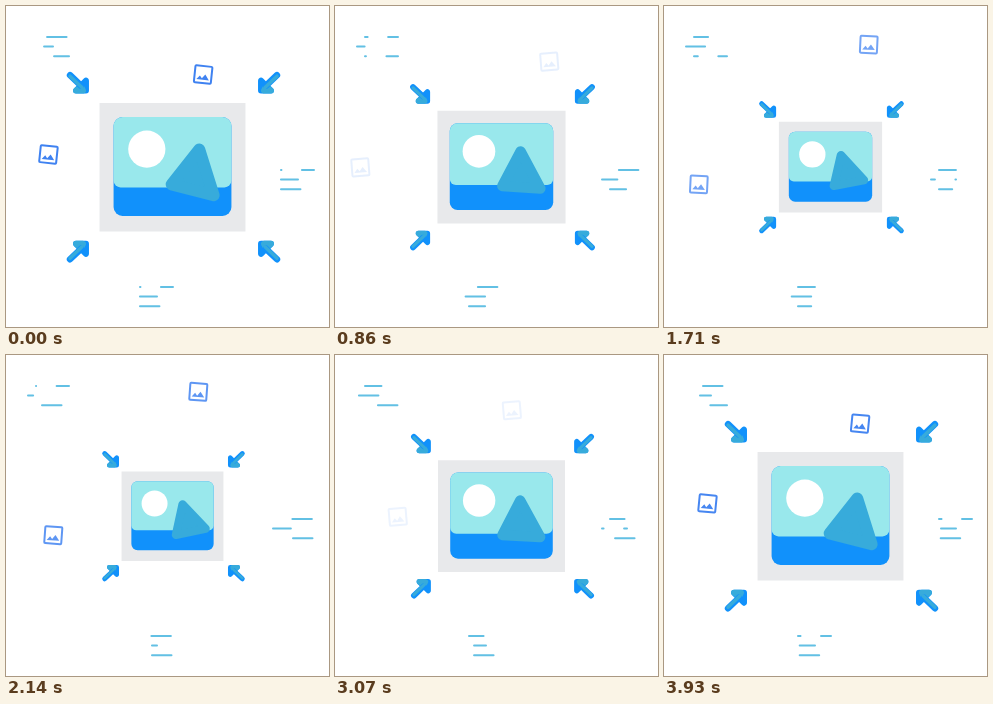
An HTML page with a canvas for the animation above (4000 ms loop, 323 by 321 pixels).

```html
<!DOCTYPE html>
<html>
<head>
<meta charset="utf-8">
<style>
  html, body { margin: 0; width: 100%; height: 100%; overflow: hidden; background: #fff; }
  canvas { display: block; width: 323px; height: 321px; }
</style>
</head>
<body>
<canvas></canvas>
<script>
const LOOP = 4000;
const CENTER = { x: 166.5, y: 161.2 };
const BLUE = '#1191fb', TEAL = '#37abdb', CYAN = '#99e8ec';
const canvas = document.querySelector('canvas');
const ctx = canvas.getContext('2d');
const dpr = window.devicePixelRatio || 1;
canvas.width = 323 * dpr;
canvas.height = 321 * dpr;

function at(x, y, draw) {
  ctx.save();
  ctx.translate(x, y);
  draw();
  ctx.restore();
}

function rotate(degrees) {
  ctx.rotate(degrees * Math.PI / 180);
}

function roundTriangle(a, b, c, radius, color) {
  ctx.beginPath();
  for (const point of [a, b, c]) ctx.lineTo(...point);
  ctx.closePath();
  ctx.fillStyle = ctx.strokeStyle = color;
  ctx.lineWidth = radius * 2;
  ctx.lineJoin = 'round';
  ctx.fill();
  ctx.stroke();
}

// A box centred horizontally on the current origin
function box(top, width, height, radius, color) {
  ctx.beginPath();
  ctx.roundRect(-width / 2, top, width, height, radius);
  ctx.fillStyle = color;
  ctx.fill();
}

function line(x1, y1, x2, y2, width, color) {
  ctx.beginPath();
  ctx.moveTo(x1, y1);
  ctx.lineTo(x2, y2);
  ctx.lineWidth = width;
  ctx.strokeStyle = color;
  ctx.lineCap = 'round';
  ctx.stroke();
}

// Three rows of dashes sliding behind fixed windows; laps = dashes passing per loop
function drawDashes(x, y, phase, starts, laps) {
  ctx.setLineDash([19.5, 20.5]);
  starts.forEach((start, row) => {
    const left = row === 1 ? -7 : 1;
    const right = row === 1 ? 18 : 34;
    const shift = left - start - 1 - 40 * laps[row] * phase;
    ctx.lineDashOffset = (shift % 40 + 40) % 40;
    const rowY = y + 9.6 * row;
    line(x + left, rowY, x + right, rowY, 2, '#62c0e4');
  });
  ctx.setLineDash([]);
}

function drawIcon(x, y, visible) {
  at(x, y, () => {
    rotate(12 * visible - 6);
    ctx.globalAlpha = visible;
    ctx.strokeStyle = ctx.fillStyle = '#3f82f1';
    ctx.lineWidth = 2;
    ctx.beginPath();
    ctx.roundRect(-8.5, -8.5, 17, 17, 1);
    ctx.stroke();
    ctx.fill(new Path2D('M2.2-.2L-.9 3.9-3.1 1.2-6.3 5.2H6.3z'));
  });
}

function drawPicture(shrink) {
  at(CENTER.x, CENTER.y, () => {
    const scale = 1 - 0.31 * shrink;
    ctx.scale(scale, scale);
    box(-64.5, 146.6, 129, 0, '#e8e9eb');
    box(-50.4, 118.4, 99.4, 9, BLUE);
    box(-50.4, 118.4, 70.7, [9, 9, 7, 7], CYAN);
    ctx.beginPath();
    ctx.arc(-25.8, -18.2, 18.7, 0, 7);
    ctx.fillStyle = '#fff';
    ctx.fill();
    ctx.translate(22.5, 9.5);
    rotate(14.4 - 27 * shrink);
    roundTriangle([-2.3, -27.5], [-20.8, 13.2], [22.8, 13.5], 6, TEAL);
  });
}

function drawArrow(sideX, sideY, shrink) {
  const x = CENTER.x + 1 + sideX * (85 - 31 * shrink);
  const y = CENTER.y + sideY * (74 - 25.7 * shrink);
  at(x, y, () => {
    const scale = 1 - 0.25 * shrink;
    ctx.scale(-sideX * scale, -sideY * scale);
    roundTriangle([-3, -13], [-3, -3], [-13, -3], 3, BLUE);
    roundTriangle([-8, -7], [-6, -3], [-13, -3], 3, TEAL);
    line(-19, -18.5, -8, -8, 6.5, BLUE);
    line(-19, -17.5, -7, -6, 3.5, TEAL);
  });
}

function render(phase) {
  const turn = phase * 2 * Math.PI;
  const shrink = 0.015 + 0.985 * (1 - Math.cos(turn)) / 2;
  const visible = Math.abs(1 - (phase * 4) % 2);
  const angle = turn + 0.08 * Math.cos(turn);
  const orbitX = 19 * Math.sin(angle);
  const orbitY = 16 * Math.cos(angle);

  ctx.setTransform(dpr, 0, 0, dpr, 0, 0);
  ctx.fillStyle = '#fff';
  ctx.fillRect(0, 0, 323, 321);
  drawDashes(29, 31, phase, [11, 8, 18], [6, 6, 5]);
  drawDashes(274, 164, phase, [21, 0, 0], [-6, -6, -5]);
  drawDashes(133, 281, phase, [21, 0, 0], [-6, -5, -5]);
  drawIcon(195.6 + orbitX, 52.6 + orbitY, visible);
  drawIcon(44 - orbitX, 164.4 - orbitY, visible);
  drawPicture(shrink);
  for (const sideX of [-1, 1])
    for (const sideY of [-1, 1]) drawArrow(sideX, sideY, shrink);
}

const begin = performance.now();

function tick() {
  // The cycle runs slightly fast, so the loop closes just after its last pose
  render((performance.now() - begin) % LOOP / LOOP * 1.009);
  requestAnimationFrame(tick);
}
tick();
</script>
</body>
</html>
```
